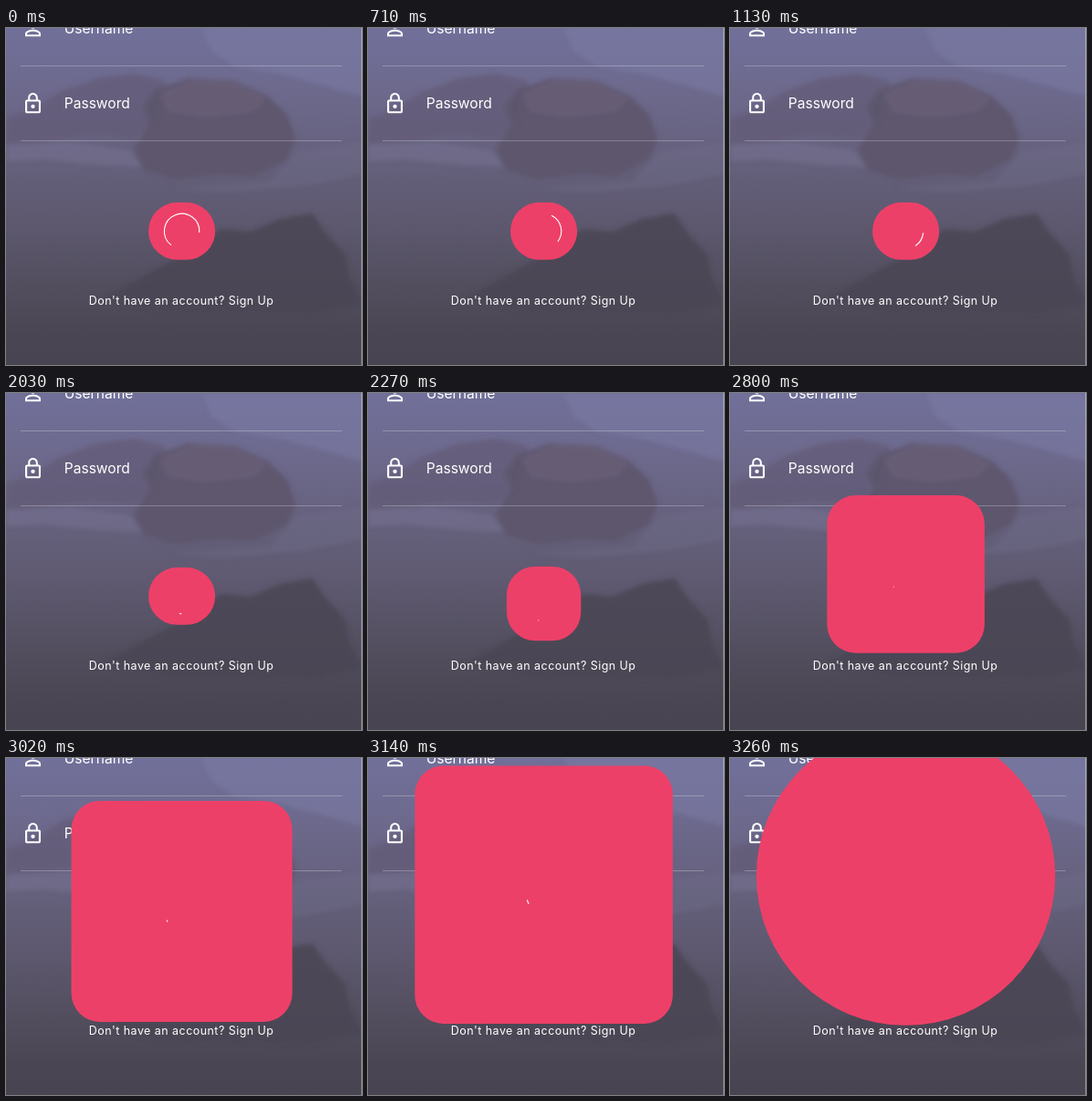
An HTML page for the animation above (3.36 s loop, 390 by 369 pixels).

```html
<!DOCTYPE html>
<html lang="en">
<head>
<meta charset="utf-8">
<title>Login</title>
<style>
  html, body { margin: 0; width: 100%; height: 100%; overflow: hidden; background: #4a4653; }
  svg { display: block; width: 390px; height: 369px; }
  text { font-family: Inter, Roboto, sans-serif; fill: #fff; }
</style>
</head>
<body>
<svg viewBox="0 0 390 369">
  <defs>
    <linearGradient id="sea" x2="0" y2="1">
      <stop offset="0" stop-color="#71709a"/>
      <stop offset=".15" stop-color="#6e6b90"/>
      <stop offset=".35" stop-color="#67627f"/>
      <stop offset=".55" stop-color="#5f5a71"/>
      <stop offset=".8" stop-color="#504c5b"/>
      <stop offset=".92" stop-color="#494552"/>
      <stop offset="1" stop-color="#484451"/>
    </linearGradient>
    <filter id="soft" x="-10%" y="-10%" width="120%" height="120%">
      <feGaussianBlur stdDeviation="2.5"/>
    </filter>
  </defs>

  <rect width="390" height="369" fill="url(#sea)"/>
  <g filter="url(#soft)">
    <path fill="#7c7ca6" opacity=".5" d="M215 0H390V75L345 62 300 50 250 42 225 25Z"/>
    <path fill="#655d77" opacity=".75" d="M0 100 30 88 60 70 100 55 140 50 175 58 165 105 140 122 90 118 45 124 0 128Z"/>
    <path fill="#5d556c" opacity=".9" d="M140 132 158 105 150 88 163 68 200 55 250 58 286 74 308 95 317 122 308 144 270 163 235 160 185 166 150 155Z"/>
    <path fill="#6a6079" opacity=".7" d="M168 72 205 56 250 59 286 77 272 92 220 98 178 92Z"/>
    <path fill="#7b7898" opacity=".45" d="M0 128 70 125 135 134 150 152 100 150 40 144 0 146Z"/>
    <path fill="#747090" opacity=".3" d="M320 135 390 125V160L330 172 240 180 180 176 290 168Z"/>
    <path fill="#4b4754" opacity=".85" d="M105 297 170 261 200 247 235 220 268 223 300 209 336 203 350 224 372 248 376 272 390 302 340 312 180 310Z"/>
  </g>
  <rect x="389" width="1" height="369" fill="#fff" opacity=".35"/>

  <g fill="#fff">
    <path transform="translate(16.8 -12) scale(1.06)" d="M12 5.9c1.16 0 2.1.94 2.1 2.1s-.94 2.1-2.1 2.1S9.9 9.16 9.9 8s.94-2.1 2.1-2.1m0 9c2.97 0 6.1 1.46 6.1 2.1v1.1H5.9V17c0-.64 3.13-2.1 6.1-2.1M12 4C9.79 4 8 5.79 8 8s1.79 4 4 4 4-1.79 4-4-1.79-4-4-4zm0 9c-2.67 0-8 1.34-8 4v3h16v-3c0-2.66-5.33-4-8-4z"/>
    <path transform="translate(16.8 70) scale(1.06)" d="M12 17c1.1 0 2-.9 2-2s-.9-2-2-2-2 .9-2 2 .9 2 2 2zm6-9h-1V6c0-2.76-2.24-5-5-5S7 3.24 7 6v2H6c-1.1 0-2 .9-2 2v10c0 1.1.9 2 2 2h12c1.1 0 2-.9 2-2V10c0-1.1-.9-2-2-2zM8.9 6c0-1.71 1.39-3.1 3.1-3.1s3.1 1.39 3.1 3.1v2H8.9V6zM18 20H6V10h12v10z"/>
    <path opacity=".26" d="M16 41H368V42H16ZM16 123H368V124H16Z"/>
  </g>
  <text x="63.7" y="6" font-size="15.6">Username</text>
  <text x="63.7" y="88" font-size="15.6">Password</text>
  <text x="90.8" y="303" font-size="12.5" letter-spacing=".45">Don't have an account? Sign Up</text>

  <rect id="button" fill="#ed4068"/>
  <path id="spinner" fill="none" stroke="#fff" stroke-width="1.1"/>
</svg>
<script>
const LOOP = 3360, SCALE = 1.045, CX = 192.6;
const SHORT_STEPS = [9, 46, 48, 50];
const STARTS = Array.from({ length: 56 }, (_, i) =>
  i * 60 - 10 * SHORT_STEPS.filter(s => s <= i).length);
// Time in ms against progress of the zoom
const ZOOM = [[2050, 0], [2510, .0698], [3020, .1516], [3260, .186]];

const button = document.getElementById('button');
const spinner = document.getElementById('spinner');

const clamp = x => Math.min(1, Math.max(0, x));

function bezier(x1, y1, x2, y2) {
  const at = (a, b, s) => 3 * (1 - s) ** 2 * s * a + 3 * (1 - s) * s * s * b + s ** 3;
  return x => {
    if (x <= 0 || x >= 1) return clamp(x);
    let lo = 0, hi = 1;
    for (let i = 0; i < 24; i++) {
      const mid = (lo + hi) / 2;
      if (at(x1, x2, mid) < x) lo = mid; else hi = mid;
    }
    return at(y1, y2, lo);
  };
}
const ease = bezier(.25, .1, .25, 1);
const fastOutSlowIn = bezier(.4, 0, .2, 1);

function interpolate(keys, t) {
  if (t <= keys[0][0]) return keys[0][1];
  for (let i = 1; i < keys.length; i++) {
    const [t0, v0] = keys[i - 1], [t1, v1] = keys[i];
    if (t <= t1) return v0 + (v1 - v0) * (t - t0) / (t1 - t0);
  }
  return keys[keys.length - 1][1];
}

function setAttributes(el, attributes) {
  for (const name in attributes) el.setAttribute(name, attributes[name]);
}

function arc(cx, cy, r, from, sweep) {
  const point = deg => {
    const a = deg * Math.PI / 180;
    return `${cx + r * Math.cos(a)} ${cy + r * Math.sin(a)}`;
  };
  return `M${point(from)}A${r} ${r} 0 ${sweep > 180 ? 1 : 0} 1 ${point(from + sweep)}`;
}

function draw(t) {
  const zoom = interpolate(ZOOM, t);
  const size = 70 + 930 * 7.5625 * zoom * zoom;
  const width = size * SCALE;
  const height = (zoom > 0 ? size : 60) * SCALE;
  const drop = zoom > 0 ? 50 * SCALE * ease((t - 1345) / 4260) : 0;
  const top = 253.8 + drop - height;
  const round = size >= 300;
  setAttributes(button, {
    x: CX - width / 2, y: top, width, height,
    rx: round ? width / 2 : 30 * SCALE
  });

  // The tail catches up with the head, then the head sets off again
  const phase = .193 + t / 3333;
  const tail = 270 * fastOutSlowIn(phase);
  const head = 270 + 270 * fastOutSlowIn(phase - 1);
  const from = -265.5 + tail + 306 * t / 6666;
  const sweep = Math.max(head - tail, 2);
  spinner.setAttribute('d', round ? '' : arc(CX, top + height / 2, 19.2, from, sweep));
}

const origin = performance.now();
function tick() {
  const t = (performance.now() - origin) % LOOP;
  draw(STARTS.filter(s => s <= t).pop());
  requestAnimationFrame(tick);
}
tick();
</script>
</body>
</html>
```
